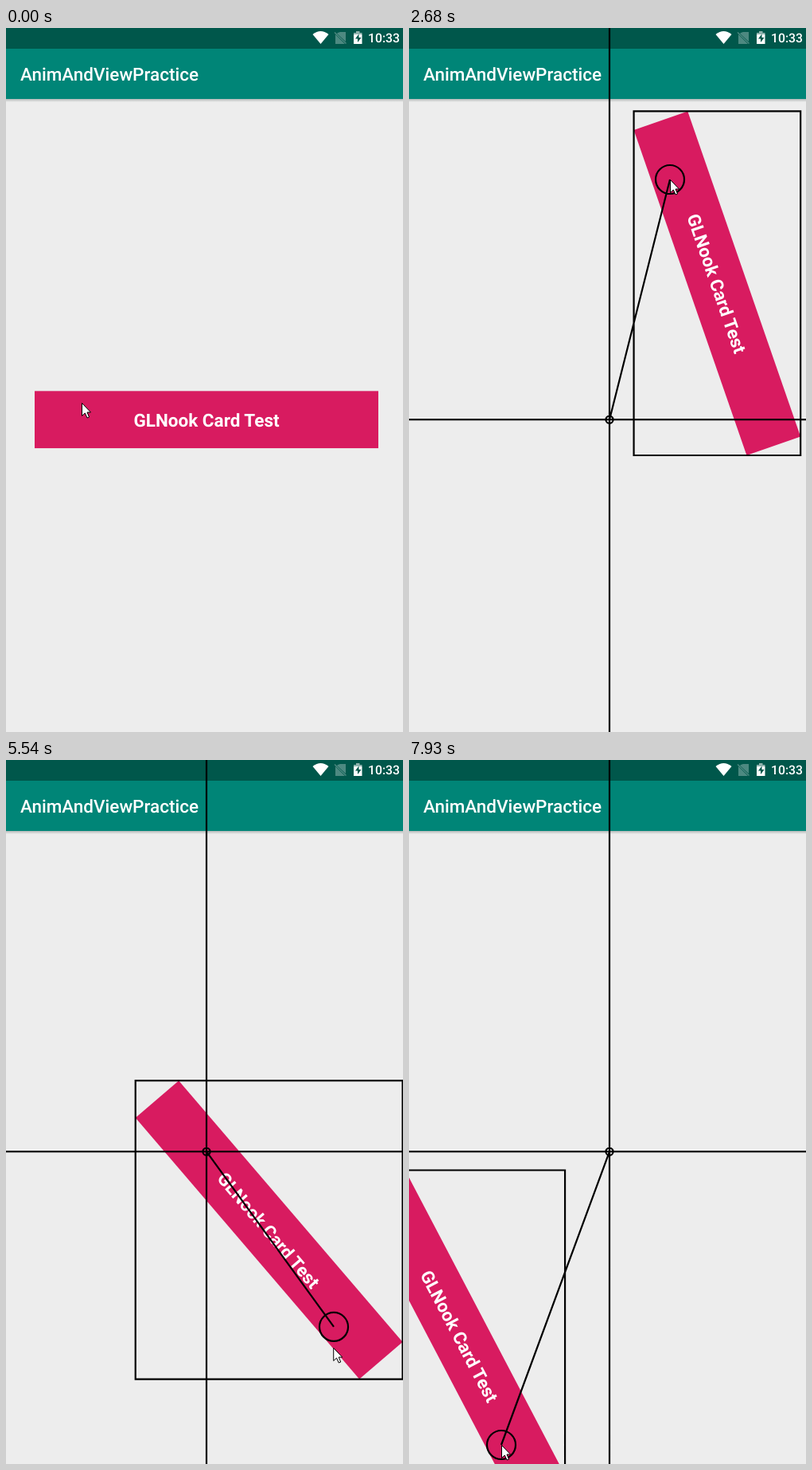
These frames come from a looping animation (499 px wide and 883 px high, 7.99 s). An HTML page with a canvas:

```html
<!DOCTYPE html>
<html lang="en">
<head>
<meta charset="utf-8">
<title>Draggable card</title>
<style>
  html, body { margin: 0; width: 100%; height: 100%; overflow: hidden; background: #ededed; }
  canvas { display: block; }
</style>
</head>
<body>
<canvas id="stage" width="499" height="883"></canvas>
<script>
const ctx = document.getElementById('stage').getContext('2d');
const W = 499, H = 883, LOOP = 7990;
const HOME = { x: 252, y: 491.2, angle: 0 };
const CARD = { w: 432, h: 71.7 };
const POINTER_LEAD = 30; // the card trails the mouse a little, ms
const RETURN_MS = 300;

// Each drag holds the card at a fixed point (u, v) relative to its middle;
// up and down are the tilts in degrees it tends to above and below home.
const DRAGS = [
  { from: 640, to: 4320, side: -1, u: -142.5, v: 13.3, up: 88.7, down: 82 },
  { from: 5370, to: LOOP, side: 1, u: 145.2, v: 17.4, up: 87.1, down: 85.3 }
];

// The hand passes these points, resting at some of them.
const point = (t, x, y, rest = 0) => rest ? [{ t, x, y }, { t: t + rest, x, y }] : [{ t, x, y }];
const PATH = [
  point(0, 95, 470, 130),
  point(460, 113, 499, 170),
  point(1400, 126, 800),
  point(1970, 166, 231),
  point(2210, 181, 162, 130),
  point(2680, 328, 190, 180),
  point(3430, 366, 751),
  point(3600, 378, 815),
  point(4130, 128, 771, 190),
  point(5190, 383, 488, 170),
  point(5540, 412, 710),
  point(5740, 400, 825),
  point(6160, 405, 576),
  point(6760, 268, 155),
  point(6980, 183, 194),
  point(7040, 169, 195, 180),
  point(7680, 160, 860, 245),
  point(7930, 116, 859, 60)
].flat();

// Speed at a point; zero at turning points and next to rests.
function speed(i, axis) {
  const a = PATH[i - 1], b = PATH[i], c = PATH[i + 1];
  if (!a || !c || (b[axis] - a[axis]) * (c[axis] - b[axis]) <= 0) return 0;
  return (c[axis] - a[axis]) / (c.t - a.t);
}

function handAt(time) {
  const t = Math.min(time, LOOP);
  const i = Math.max(0, PATH.findIndex(p => p.t > t) - 1 + (t === LOOP) * (PATH.length));
  const a = PATH[i], b = PATH[i + 1];
  if (!b) return a;
  const span = b.t - a.t, p = (t - a.t) / span, ease = p * p * (3 - 2 * p);
  const along = axis => a[axis] + (b[axis] - a[axis]) * ease
    + span * p * (1 - p) * ((1 - p) * speed(i, axis) - p * speed(i + 1, axis));
  return { x: along('x'), y: along('y') };
}

function rotate(x, y, angle) {
  const c = Math.cos(angle), s = Math.sin(angle);
  return { x: x * c - y * s, y: x * s + y * c };
}

// The card tilts by the vertical share of the hand's distance from home.
function draggedCard(drag, t) {
  const hand = handAt(t), dx = hand.x - HOME.x, dy = hand.y - HOME.y;
  const tilt = (dy < 0 ? drag.up : drag.down) * Math.min(1, (t - drag.from) / 160);
  const share = dy / (Math.abs(dx) + Math.abs(dy) || 1);
  const angle = drag.side * tilt * share * Math.PI / 180;
  const grip = rotate(drag.u, drag.v, angle);
  return { x: hand.x - grip.x, y: hand.y - grip.y, angle };
}

function cardAt(t, drag) {
  if (drag) return draggedCard(drag, t);
  const p = (t - DRAGS[0].to) / RETURN_MS;
  if (p < 0 || p > 1) return HOME;
  const start = draggedCard(DRAGS[0], DRAGS[0].to), rest = (1 - p) ** 2;
  const back = key => HOME[key] + (start[key] - HOME[key]) * rest;
  return { x: back('x'), y: back('y'), angle: back('angle') };
}

function rect(color, x, y, w, h) {
  ctx.fillStyle = color;
  ctx.fillRect(x, y, w, h);
}

function text(str, x, y, font, align = 'left') {
  ctx.font = font + ' Roboto, sans-serif';
  ctx.textRendering = 'geometricPrecision';
  ctx.textAlign = align;
  ctx.fillStyle = '#fff';
  ctx.fillText(str, x, y);
}

function shape(d, fill, x = 0, y = 0, stroke) {
  const path = new Path2D(d);
  ctx.save();
  ctx.translate(x, y);
  ctx.fillStyle = fill;
  ctx.fill(path);
  if (stroke) {
    ctx.strokeStyle = stroke;
    ctx.lineWidth = 1;
    ctx.stroke(path);
  }
  ctx.restore();
}

function drawScreen() {
  rect('#ededed', 0, 0, W, H);
  const shadow = ctx.createLinearGradient(0, 89, 0, 93);
  shadow.addColorStop(0, '#b4b9b8');
  shadow.addColorStop(1, '#ededed');
  rect(shadow, 0, 89, W, 4);
  rect('#008577', 0, 26, W, 63);
  rect('#00574b', 0, 0, W, 26);
  text('AnimAndViewPractice', 18, 66, '500 22.5px');
  text('10:33', 455, 18, '500 15.75px');
  shape('M395.5 20L385.5 8Q395.5 0 405.5 8Z', '#fff');
  shape('M417 6L420 5H427V17L416 7ZM414 8L426 20H414Z', '#4d8981');
  shape('M412.5 6L413.5 5L428 19L427 20Z', '#4d8981');
  shape('M437 6H440V4H444.5V6H447.5V8H437Z', '#8fb3ae');
  rect('#fff', 437, 8, 10.5, 12);
  shape('M443.5 7.5L439 13.5H442V18L446.5 12H443.5Z', '#00574b');
}

function drawCard(card) {
  ctx.save();
  ctx.translate(card.x, card.y);
  ctx.rotate(card.angle);
  rect('#d81b60', -CARD.w / 2, -CARD.h / 2, CARD.w, CARD.h);
  text('GLNook Card Test', 0, 8.8, 'bold 22.5px', 'center');
  ctx.restore();
}

function drawGuides(card, hand) {
  const c = Math.abs(Math.cos(card.angle)), s = Math.abs(Math.sin(card.angle));
  const w = CARD.w * c + CARD.h * s, h = CARD.w * s + CARD.h * c;
  const line = (x1, y1, x2, y2) => { ctx.moveTo(x1, y1); ctx.lineTo(x2, y2); };
  const circle = (x, y, r) => { ctx.moveTo(x + r, y); ctx.arc(x, y, r, 0, 2 * Math.PI); };
  ctx.strokeStyle = '#000';
  ctx.lineWidth = 2.2;
  ctx.beginPath();
  ctx.rect(card.x - w / 2, card.y - h / 2, w, h);
  line(0, HOME.y, W, HOME.y);
  line(HOME.x, 0, HOME.x, H);
  line(HOME.x, HOME.y, hand.x, hand.y);
  circle(HOME.x, HOME.y, 4.6);
  circle(hand.x, hand.y, 18);
  ctx.stroke();
}

function drawPointer({ x, y }) {
  shape('M.5 .5V16.5L4.3 13L7 19L9.5 18L7 12H11.5Z', '#fff', x, y, '#000');
}

function render(t) {
  const drag = DRAGS.find(d => t >= d.from && t < d.to);
  drawScreen();
  const card = cardAt(t, drag);
  drawCard(card);
  if (drag) drawGuides(card, handAt(t));
  drawPointer(handAt(t + POINTER_LEAD));
}

const started = performance.now();
function frame() {
  render((performance.now() - started) % LOOP);
  requestAnimationFrame(frame);
}
frame();
</script>
</body>
</html>
```
